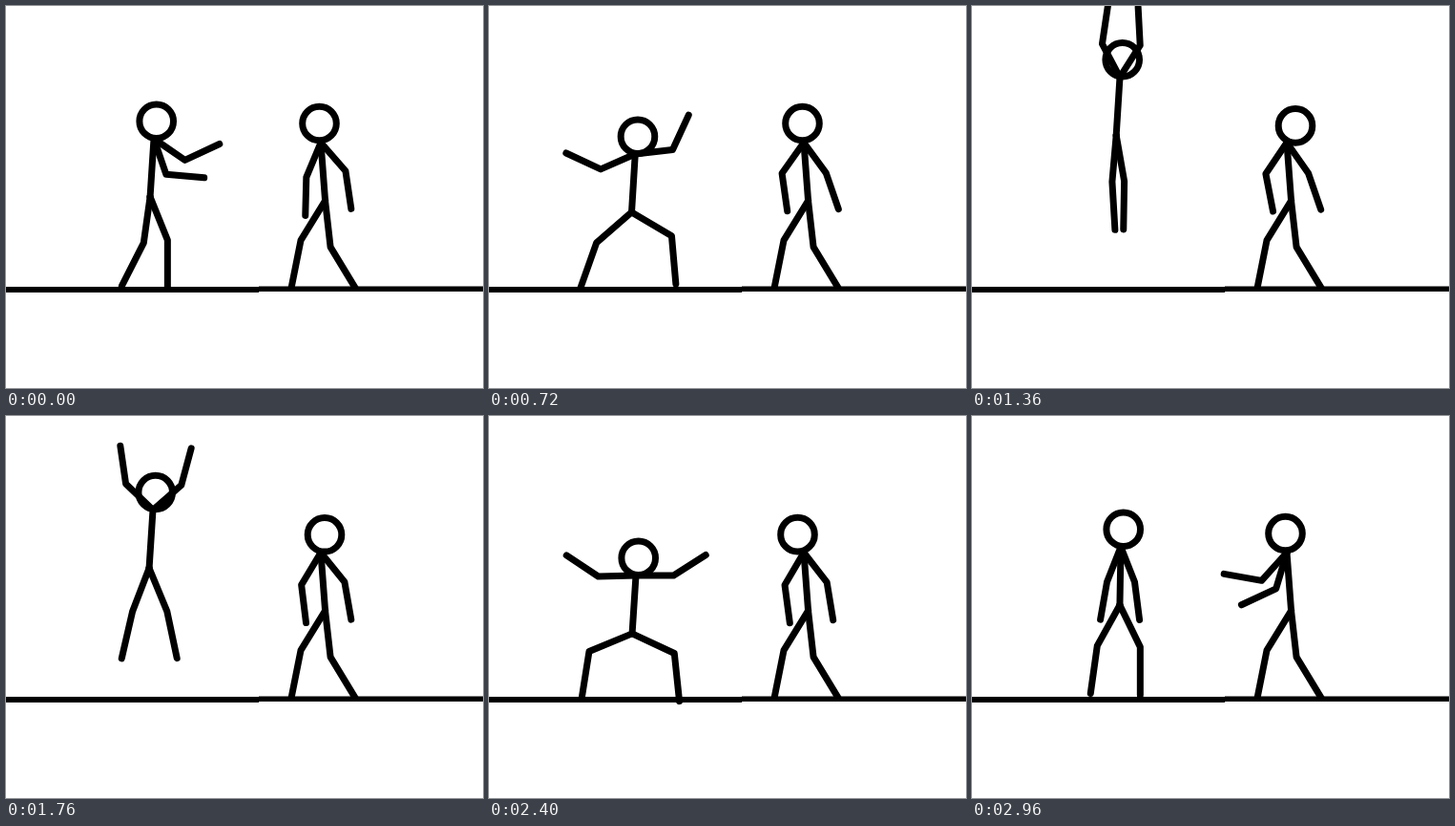
An HTML page with a canvas that plays this animation: 500x400 px, repeating every 3.04 s.

```html
<!DOCTYPE html>
<html lang="en">
<head>
<meta charset="utf-8">
<title>Stick figures</title>
<style>
html, body { margin: 0; width: 100%; height: 100%; overflow: hidden; background: #fff; }
canvas { display: block; }
</style>
</head>
<body>
<canvas id="stage" width="500" height="400"></canvas>
<script>
const ctx = document.getElementById('stage').getContext('2d');
const STEP = 80, COUNT = 38;
const BONE = { torso: 61, upper: 39.5, fore: 40, thigh: 48.8, shin: 50.4 };

// Angles in degrees: 0 points right, 90 down.
// Limbs: back upper and lower bone, then front upper and lower bone.
const jumper = [
  { at: 0,  x: 155,   torso: 93.7, arms: [71, 5, 34.5, -25],       legs: [98, 117, 68, 90] },     // guard
  { at: 6,  x: 153,   torso: 93.7, arms: [124, 158, 9, -49],       legs: [153, 121, 11.5, 82] },  // lunge
  { at: 12, x: 153.5, torso: 93.3, arms: [188.5, 252, -22, -81.5], legs: [125, 98, 50, 88] },     // take-off
  { at: 17, x: 155,   torso: 93.6, arms: [242, 278.5, -57.5, -93], legs: [95, 86.6, 80, 91] },    // top
  { at: 22, x: 154,   torso: 93.7, arms: [224, 261.7, -41, -75],   legs: [111, 103, 67.5, 78] },  // fall
  { at: 30, x: 154,   torso: 93.7, arms: [178.5, 213.7, 0, -32.5], legs: [157.5, 99, 25, 84] },   // crouch
  { at: 37, x: 156,   torso: 91,   arms: [111.5, 100, 68.5, 82.7], legs: [119, 98, 64, 90] }      // rest
];
const neckHeight = [
  { at: 0, y: 139 }, { at: 6, y: 172 }, { at: 12, y: 138 }, { at: 18, y: 70 },
  { at: 29, y: 167 }, { at: 31, y: 167 }, { at: 37, y: 137 }
];

const watcher = { x: 330, y: 143, torso: 85.7, legs: [121.6, 101.3, 83.5, 58.8] };
const watcherArms = [
  { at: 0,  arms: [112.6, 91.5, 49, 81.5] },
  { at: 6,  arms: [126, 83, 53.4, 71] },
  { at: 17, arms: [124, 79, 55, 71] },
  { at: 22, arms: [121, 83, 51, 80] },
  { at: 35, arms: [120, 82, 53, 81] },
  { at: 37, arms: [132, 190, 106.6, 155] }
];
const gaze = [
  { at: 0, dx: 0 }, { at: 12, dx: 0 }, { at: 17, dx: 10.5 }, { at: 30, dx: -5 }, { at: 37, dx: 0 }
];

const linear = k => k;
const smooth = k => (1 - Math.cos(Math.PI * k)) / 2;

function mix(a, b, k) {
  return Array.isArray(a) ? a.map((v, i) => mix(v, b[i], k)) : a + (b - a) * k;
}

function tween(keys, step, ease = linear) {
  const next = Math.max(1, keys.findIndex(key => key.at >= step));
  const a = keys[next - 1], b = keys[next];
  const k = ease((step - a.at) / (b.at - a.at));
  const out = {};
  for (const name in a) out[name] = mix(a[name], b[name], k);
  return out;
}

function tip([x, y], degrees, length) {
  const angle = degrees * Math.PI / 180;
  return [x + length * Math.cos(angle), y + length * Math.sin(angle)];
}

function line(...points) {
  ctx.beginPath();
  for (const p of points) ctx.lineTo(...p);
  ctx.stroke();
}

function limbs(root, angles, upper, lower) {
  for (const i of [0, 2]) {
    const joint = tip(root, angles[i], upper);
    line(root, joint, tip(joint, angles[i + 1], lower));
  }
}

function figure({ x, y, torso, arms, legs }, headX, headY) {
  const neck = [x, y], hip = tip(neck, torso, BONE.torso);
  line(neck, hip);
  limbs(neck, arms, BONE.upper, BONE.fore);
  limbs(hip, legs, BONE.thigh, BONE.shin);
  ctx.beginPath();
  ctx.arc(x + headX, y + headY, 17.8, 0, Math.PI * 2);
  ctx.stroke();
}

function draw(step) {
  ctx.fillStyle = '#fff';
  ctx.fillRect(0, 0, 500, 400);
  ctx.fillStyle = ctx.strokeStyle = '#000';
  ctx.lineWidth = 7;
  ctx.lineCap = ctx.lineJoin = 'round';

  ctx.fillRect(0, 294, 265, 6);
  ctx.fillRect(265, 293.5, 235, 5.5);

  const { y } = tween(neckHeight, step, smooth);
  figure({ ...tween(jumper, step), y }, 2.7, -18.3);

  const { dx } = tween(gaze, step, smooth);
  const { arms } = tween(watcherArms, step);
  figure({ ...watcher, arms }, dx - 1.5, Math.abs(dx) * 0.23 - 20);
}

const start = performance.now();
function loop() {
  const t = Math.max(0, performance.now() - start);
  draw(Math.floor(t / STEP) % COUNT);
  requestAnimationFrame(loop);
}
loop();
</script>
</body>
</html>
```
